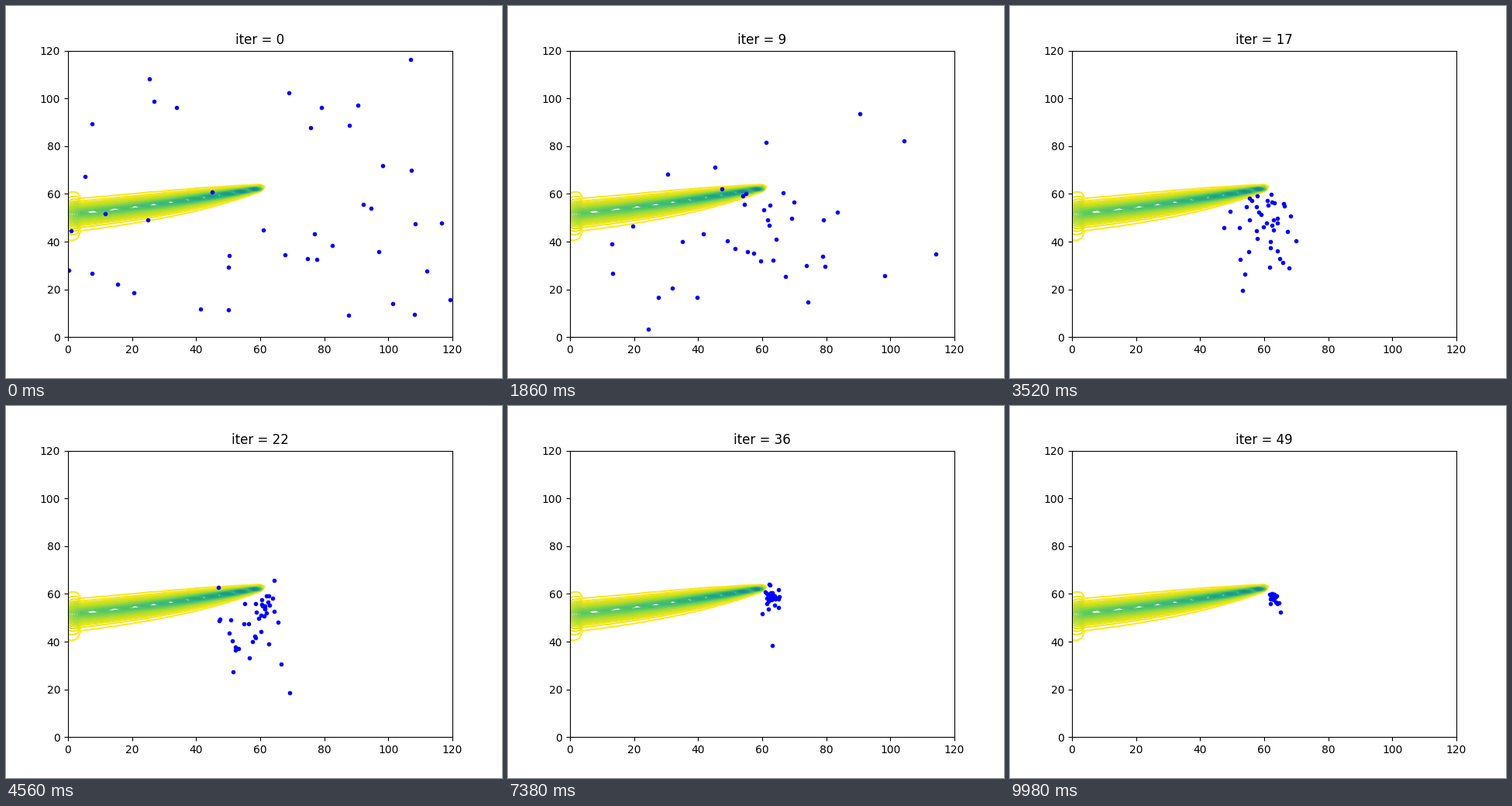
Write a matplotlib script that moves like this. It is 640 px wide and 480 px high and loops after 10 s.

```python
import numpy as np
import matplotlib.pyplot as plt
from matplotlib.animation import FuncAnimation

ITERS, STEPS, COUNT, SIZE = 50, 10, 41, 120
GOAL = np.array([62.9, 59.2])
rng = np.random.default_rng(12)

# How far the swarm sags from the goal and scatters around it, by iteration.
TIMES = [1, 5, 12, 23, 28, 37, 50]
SHIFT = [[-6, -12, -4, -8, -2, 0, 0], [-5, -15, -31, -25, -13, -5, -1.5]]
SPREAD = [[45, 75, 16, 11, 7, 5, 2], [45, 75, 22, 22, 19, 11, 3.5]]


def over_time(rows):
    t = np.arange(ITERS + 1)
    return np.array([np.interp(t, TIMES, row) for row in rows])


def swarm():
    """Position of each particle at each iteration: (particle, axis, iteration)."""
    shape = (COUNT, 2, ITERS + 1)
    swing = rng.normal(size=shape).clip(-2, 2) * over_time(SPREAD)
    # Ever more particles stay near the goal, a few still stray.
    stray = rng.random((COUNT, 1, ITERS + 1)) ** (np.arange(ITERS + 1) / 15)
    core = rng.normal(0, 0.4, (COUNT, 2, 1))
    paths = GOAL[:, None] + core + (over_time(SHIFT) + swing) * stray
    paths[:, :, 0] = rng.uniform(0, SIZE, (COUNT, 2))
    return paths


def plume():
    """Concentration drifting left from a source, widening and bending down."""
    x, y = np.meshgrid(np.arange(SIZE + 1.0), np.arange(SIZE + 1.0))
    ridge = 51.5 + 0.128 * x + 0.0009 * x**2
    age = np.clip(60.5 - x, 0, None)
    near_wall = np.clip(1 - x / 4, 0, 1)
    flare = np.sqrt(1 - (1 - near_wall) ** 2)

    width = 0.42 + 3.4 * (1 - np.exp(-age / 32))
    width *= (1 + 0.65 * flare) * np.where(y > ridge, 0.9, 1.1)
    peak = (0.23 + 0.42 * np.exp(-age / 25)) * (1 - 0.4 * near_wall)
    front = np.exp(-2.3 * np.clip(x - 60, 0, None) ** 2)
    return peak * front * np.exp(-np.abs((y - ridge) / width) ** 1.4)


fig, ax = plt.subplots(figsize=(6.4, 4.8), dpi=100)
ax.set(xlim=(0, SIZE), ylim=(0, SIZE))
ax.contour(plume(), levels=np.linspace(1 / 60, 1, 60), cmap="viridis_r")

# Draw the still parts once and reuse them as a backdrop.
ax.spines[:].set_visible(False)
fig.canvas.draw()
fig.figimage(np.array(fig.canvas.buffer_rgba()), zorder=-1)
for artist in list(ax.collections):
    artist.remove()
ax.patch.set_visible(False)
ax.set(xticks=[], yticks=[], xlim=(0, SIZE), ylim=(0, SIZE))
ax.spines[:].set_visible(True)

paths = swarm()
dots, = ax.plot([], [], "b.")
title = ax.set_title("iter = 0")


def update(frame):
    k, step = divmod(frame, STEPS)
    mix = step / STEPS
    now = paths[:, :, k] * (1 - mix) + paths[:, :, k + 1] * mix
    dots.set_data(now[:, 0], now[:, 1])
    title.set_text(f"iter = {k}")
    return dots, title


anim = FuncAnimation(fig, update, frames=ITERS * STEPS, interval=20,
                     repeat=True, repeat_delay=0)
plt.show()
```
